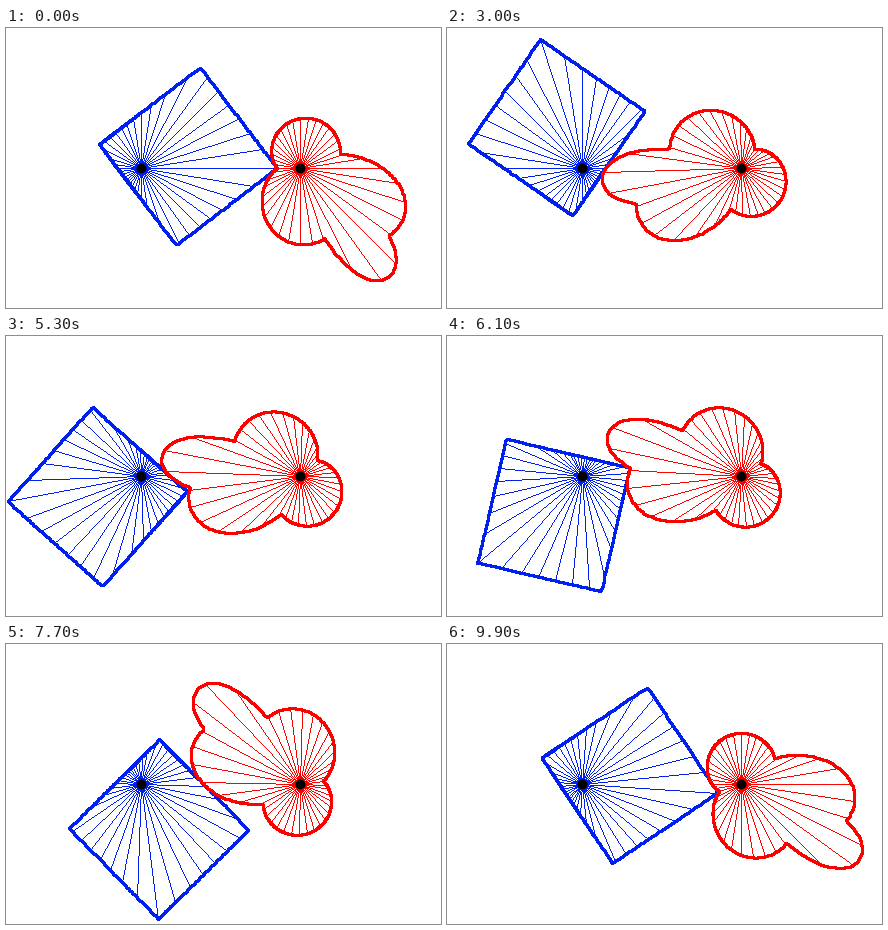
Write an HTML page with a canvas that moves like this. It is 435 px wide and 280 px high and loops after 10 s.

```html
<!DOCTYPE html>
<html lang="en">
<head>
<meta charset="utf-8">
<title>Non-circular gears</title>
<style>
html, body { margin: 0; width: 100%; height: 100%; overflow: hidden; background: #fff; }
canvas { display: block; image-rendering: pixelated; }
</style>
</head>
<body>
<canvas width="435" height="280"></canvas>
<script>
const ctx = document.querySelector('canvas').getContext('2d');
const LOOP = 10000, STEP = 100;
const TAU = 2 * Math.PI, SAMPLES = 2880, POINTS = 400, POINTS_PER_SPOKE = 10;
const LEFT = 135, RIGHT = 294, AXIS_Y = 140;
const OFFSET_U = 0.3, OFFSET_V = -0.7;
const farCorner = Math.atan2(OFFSET_V - 1, OFFSET_U + 1);

// Radius of the unit half-side square around its pivot; angle 0 is the far corner.
function squareRadius(angle) {
  const c = Math.cos(angle + farCorner), s = Math.sin(angle + farCorner);
  const du = (OFFSET_U + Math.sign(c)) / c;
  const dv = (OFFSET_V + Math.sign(s)) / s;
  return Math.min(du, dv);
}

const radii = Array.from({ length: SAMPLES }, (_, i) => squareRadius((i + 0.5) / SAMPLES * TAU));
const meanRatio = axis => radii.reduce((sum, r) => sum + r / (axis - r), 0) / SAMPLES;

// Axis distance at which both gears complete one turn together.
let near = 2.2, far = 4;
for (let i = 0; i < 50; i++) {
  const mid = (near + far) / 2;
  if (meanRatio(mid) > 1) near = mid; else far = mid;
}
const axis = (near + far) / 2;
const scale = (RIGHT - LEFT) / axis;

const turn = [0];
radii.forEach((r, i) => turn.push(turn[i] + r / (axis - r) * TAU / SAMPLES));

function drivenTurn(angle) {
  const x = angle / TAU * SAMPLES, i = Math.min(Math.floor(x), SAMPLES - 1);
  return turn[i] + (turn[i + 1] - turn[i]) * (x - i);
}

function drivenRadius(psi) {
  let i = turn.findIndex(v => v > psi) - 1;
  if (i < 0) i = SAMPLES - 1;
  const part = (psi - turn[i]) / (turn[i + 1] - turn[i]);
  return axis - squareRadius((i + part) / SAMPLES * TAU);
}

const angles = Array.from({ length: POINTS }, (_, i) => i / POINTS * TAU);
const square = {
  x: LEFT, color: '#0020f0',
  rim: angles.map(a => ({ r: squareRadius(a) * scale, a })),
};
const lobed = {
  x: RIGHT, color: '#ff0000',
  rim: angles.map(a => ({ r: drivenRadius(a) * scale, a: Math.PI - a })),
};

// Aliased line drawn with a square brush on whole pixels.
function pixelLine(x0, y0, x1, y1, size) {
  const steps = Math.max(Math.abs(x1 - x0), Math.abs(y1 - y0), 1);
  const inset = (size - 1) / 2;
  for (let i = 0; i <= steps; i++) {
    const x = Math.round(x0 + (x1 - x0) * i / steps);
    const y = Math.round(y0 + (y1 - y0) * i / steps);
    ctx.fillRect(x - inset, y - inset, size, size);
  }
}

function drawGear({ x, color, rim }, rotation) {
  const points = rim.map(({ r, a }) => [
    Math.round(x + r * Math.cos(a + rotation)),
    Math.round(AXIS_Y + r * Math.sin(a + rotation)),
  ]);
  ctx.fillStyle = color;
  points.forEach((p, i) => {
    pixelLine(...p, ...points[(i + 1) % POINTS], 3);
    if (i % POINTS_PER_SPOKE === 0) pixelLine(x, AXIS_Y, ...p, 1);
  });
}

function drawPivot(x) {
  ctx.fillStyle = '#000';
  ctx.beginPath();
  ctx.arc(x + 0.5, AXIS_Y + 0.5, 5, 0, TAU);
  ctx.fill();
}

function render(ms) {
  const angle = Math.floor(ms % LOOP / STEP) * STEP / LOOP * TAU;
  ctx.fillStyle = '#fff';
  ctx.fillRect(0, 0, 435, 280);
  drawGear(square, -angle);
  drawGear(lobed, drivenTurn(angle));
  drawPivot(LEFT);
  drawPivot(RIGHT);
}

const start = performance.now();
function tick() {
  render(performance.now() - start);
  requestAnimationFrame(tick);
}
tick();
</script>
</body>
</html>
```
